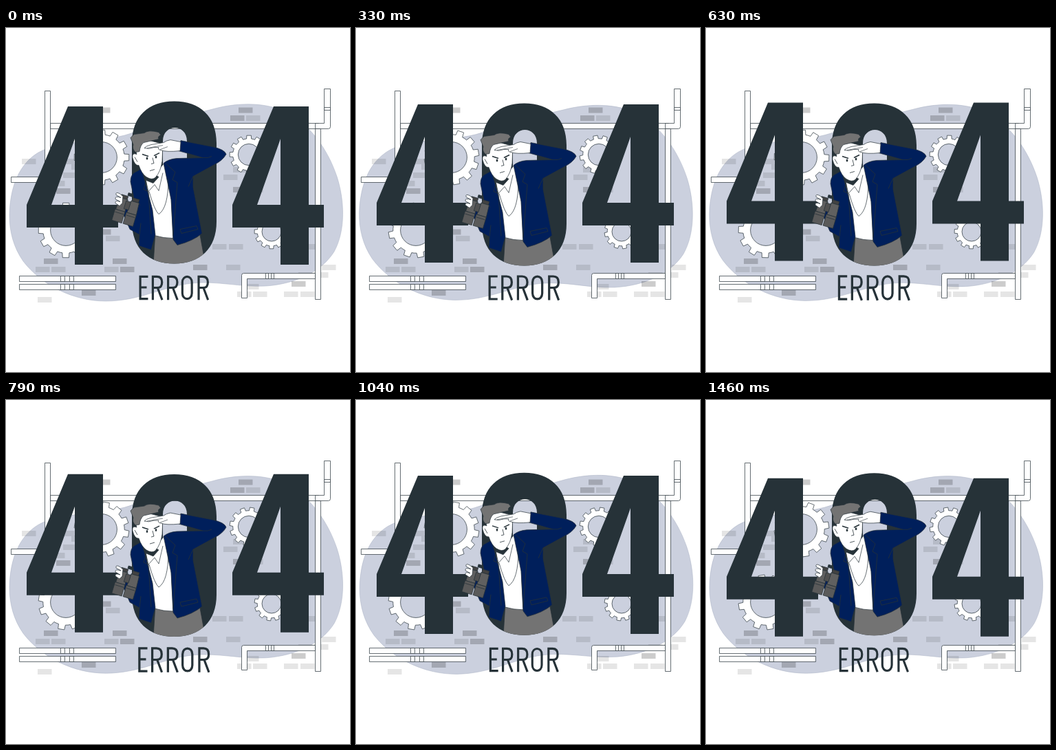
These frames come from a looping animation (500x500 px, 1500 ms). An HTML page with a canvas:

```html
<!DOCTYPE html>
<html lang="en">
<head>
<meta charset="utf-8">
<title>404 error</title>
<style>
html, body { margin: 0; width: 100%; height: 100%; overflow: hidden; background: #fff; }
canvas { display: block; width: 100vw; height: 100vh; }
</style>
</head>
<body>
<canvas id="stage" role="img" aria-label="404 ERROR"></canvas>
<script>
const LOOP = 1500;
const DARK = '#263238', NAVY = '#001f5b', GREY = '#737373', BLOB = '#cbd0de', WHITE = '#fff';
const canvas = document.getElementById('stage');
const ctx = canvas.getContext('2d');
const ratio = window.devicePixelRatio || 1;
canvas.width = canvas.height = 500 * ratio;

// Triangle wave: 1 at the peak time, -1 half a loop later.
function triangle(time, peak) {
  const phase = (((time - peak) / LOOP) % 1 + 1) % 1;
  return Math.abs(phase - 0.5) * 4 - 1;
}

function shape(d, fill, line = DARK, width = 0.7) {
  const path = typeof d === 'string' ? new Path2D(d) : d;
  if (fill) { ctx.fillStyle = fill; ctx.fill(path, 'evenodd'); }
  if (line) { ctx.strokeStyle = line; ctx.lineWidth = width; ctx.stroke(path); }
}

function box(x, y, w, h, fill = WHITE, line = DARK) {
  const path = new Path2D();
  path.rect(x, y, w, h);
  shape(path, fill, line);
}

function placed(draw, dx, dy) {
  ctx.save();
  ctx.translate(dx, dy);
  draw();
  ctx.restore();
}

function drawBlob(time) {
  ctx.save();
  ctx.translate(248, 252);
  ctx.rotate(triangle(time, 375) * Math.PI / 180);
  ctx.translate(-248, -252);
  shape('M5 272C6 230 19 198 47 181C84 160 145 169 190 150C229 134 262 128 300 118' +
    'C332 109 372 107 402 120C441 137 468 177 481 216C492 250 494 294 477 325' +
    'C459 354 421 372 378 375C340 377 306 367 270 371C227 376 194 397 145 397' +
    'C98 397 52 374 25 339C11 319 5 296 5 272Z', BLOB, '#a9b0c2', 0.5);
  ctx.restore();
}

function bricks(shade, spots) {
  for (const [x, y] of spots) box(x, y, 20.5, 8, shade, null);
}

function drawBricks() {
  bricks('rgba(0,0,0,.2)', [[338, 115.5], [326, 127], [131, 115.5], [73, 233], [330, 231],
    [132, 292.5], [55, 335], [155, 335], [166, 347], [272, 344], [110, 381], [415, 368]]);
  bricks('rgba(0,0,0,.1)', [[349, 127], [23, 190], [79, 190], [95, 198], [83, 210], [65, 222],
    [316, 213], [330, 202], [353, 231], [145, 302], [43, 347], [66, 347], [143, 347],
    [300, 314], [324, 314], [430, 314], [320, 344], [459, 344], [425, 355], [448, 355],
    [336, 383], [359, 383], [404, 383], [428, 383], [347, 372], [34, 372], [46, 391]]);
}

function drawPipes() {
  box(56, 91, 8, 130);
  box(7, 216, 60, 8);
  box(64, 138, 390, 8);
  box(449, 146, 8, 248);
  shape('M462 88H471V143Q471 146 468 146H449V138H462Z', WHITE);
  box(462, 115, 9, 4);
  shape('M449 356H345Q342 356 342 359V392H350V364H449Z', WHITE);
  box(377, 356, 4, 8);
  box(385, 356, 4, 8);
  for (const y of [360, 372]) {
    box(19, y, 140, 8);
    box(79, y, 6, 8);
    box(92, y, 6, 8);
  }
}

function drawGear(x, y, radius, time) {
  const teeth = 12;
  const root = radius * 0.83;
  const hole = radius * 0.56;
  const step = Math.PI * 2 / teeth;
  const turn = time / LOOP * Math.PI * 2;
  const path = new Path2D();
  for (let i = 0; i < teeth; i++) {
    const a = turn + i * step;
    for (const [r, offset] of [[root, -0.29], [radius, -0.22], [radius, 0.22], [root, 0.29]]) {
      path.lineTo(x + r * Math.cos(a + offset * step), y + r * Math.sin(a + offset * step));
    }
    path.arc(x, y, root, a + 0.29 * step, a + 0.71 * step);
  }
  path.closePath();
  path.moveTo(x + hole, y);
  path.arc(x, y, hole, 0, Math.PI * 2);
  shape(path, WHITE);
}

function drawFour() {
  shape('M90 114H141V257H163V290H141V344H100V290H30V257ZM100 257V161L66 257Z', DARK, null);
}

const zeroOuter = 'M183 168C183 129 207 107 244.500 107S306 129 306 168V282C306 321 282 343 244.500 343S183 321 183 282Z';

function drawZero() {
  shape(zeroOuter + 'M228 165V286C228 311 263 311 263 286V165C263 139 228 139 228 165Z', DARK, null);
}

function drawBody() {
  ctx.save();
  ctx.clip(new Path2D(zeroOuter));
  shape('M217 297L214 345H290L281 296Z', GREY);
  ctx.restore();
  shape('M203 220L214 215L230 197L239 225L243 306Q229 306 216 302Z', WHITE);
  // jacket, far side and near side
  shape('M197 205L186 211Q181 215 181 224L186 248L173 263L170 270L180 293L194 301L193 317L211 323' +
    'L217 301L213 265L204 231Z', NAVY);
  shape('M229 197Q236 191 248 190L286 189L251 179L254 164L300 173Q318 177 320 184Q315 193 303 199' +
    'L272 216L272 232L285 299Q272 310 249 316L243 308L240 250Z', NAVY);
  shape('M232 197L246 210L242 221L249 225L243 302M203 225L200 235L207 238L211 300' +
    'M272 216Q268 224 265 231M286 189Q294 190 299 187M186 248L195 258M194 301L196 284' +
    'M253 293L277 288L279 293L255 299Z', null, DARK, 0.8);
  shape('M208 238Q216 266 222 271Q236 262 236 219', null);
}

function drawHead() {
  shape('M196 203L204 222L214 226L222 217L214 212Z', DARK);
  shape('M203 221L207 238L216 228L222 237L228 211', null);
  shape('M190 170Q187 177 190 184Q183 181 184 189Q187 201 193 200Q197 212 204 217Q212 222 217 218' +
    'Q225 209 227 194L228 169L205 163Z', WHITE);
  shape('M188 181Q183 176 185 170L181 160L186 155L201 153Q207 148 222 152L225 156' +
    'Q220 158 222 162L200 167Q195 171 194 180Z', GREY);
  shape('M198 184L207 187M215 186L223 182', null, DARK, 1.5);
  shape('M213 189L215 197L211 198M209 208L216 206M187 188L191 195', null, DARK, 0.8);
  for (const [x, y] of [[205, 190], [218, 188]]) {
    const eye = new Path2D();
    eye.ellipse(x, y, 1.3, 2, 0, 0, Math.PI * 2);
    shape(eye, DARK, null);
  }
  shape('M254 166L239 163Q233 164 229 167L211 170Q203 172 201 175Q207 177 215 174L222 174' +
    'Q220 177 225 178Q233 181 253 179Z', WHITE);
  shape('M205 175L228 171M224 177L235 173', null, DARK, 0.6);
}

function drawBinoculars() {
  ctx.save();
  ctx.translate(175, 261);
  ctx.rotate(0.29);
  for (const x of [-14, 3]) {
    box(x + 2, -16, 10, 5, '#424242');
    shape(`M${x + 1} -11H${x + 13}L${x + 14} 7H${x}Z`, '#606060');
    box(x - 1, 7, 15, 17, '#5a5a5a');
    shape(`M${x} 11H${x + 13}`, null);
  }
  box(-3, -9, 7, 12, '#505050');
  box(-3, -21, 7, 4, DARK);
  ctx.restore();
  shape('M165 241Q159 238 160 243L167 247Q158 244 159 249L166 253Q158 250 159 255L165 259' +
    'L169 255L170 245Z', WHITE);
}

function drawFigure() {
  drawZero();
  drawBody();
  drawHead();
  drawBinoculars();
}

function drawError(time) {
  const keys = [[0, 103.2], [330, 105.2], [700, 107], [1040, 102.6], [1300, 101.2], [LOOP, 103.2]];
  const next = keys.findIndex(([at]) => at > time);
  const [t0, w0] = keys[next - 1], [t1, w1] = keys[next];
  const scale = (w0 + (w1 - w0) * (time - t0) / (t1 - t0)) / 104.5;
  const letter = (d, x) => placed(() => shape(d, null, DARK, 3.2), x, 0);
  ctx.save();
  ctx.translate(244, 377.5);
  ctx.scale(scale, scale);
  ctx.lineJoin = 'miter';
  letter('M13.500 -16.400H2V16.400H13.500M2 -.5H11.500', -51.5);
  for (const x of [-33, -10.5, 34.5]) {
    letter('M2 18V-16.400H8C14 -16.400 15.500 -13 15.500 -8S14 0 8 0H2M9 0L15.800 18', x);
  }
  letter('M2 -8C2 -19 16 -19 16 -8V8C16 19 2 19 2 8Z', 10.5);
  ctx.restore();
}

function draw(now) {
  const time = now % LOOP;
  ctx.setTransform(ratio, 0, 0, ratio, 0, 0);
  ctx.fillStyle = WHITE;
  ctx.fillRect(0, 0, 500, 500);
  ctx.lineJoin = 'round';
  drawBlob(time);
  drawBricks();
  placed(drawPipes, 0.5, 0.5);
  drawGear(139, 188, 40, time);
  drawGear(353, 184, 28, time);
  drawGear(87, 294, 40, time);
  drawGear(386, 296, 25, time);
  const fourLift = 3.33 * (triangle(time, 0) - 1);
  placed(drawFour, 0, fourLift);
  placed(drawFour, 299, fourLift);
  placed(drawFigure, 0, 0.5 + 3.33 * triangle(time, 480));
  drawError(time);
}

const start = performance.now();
function tick() {
  draw(performance.now() - start);
  requestAnimationFrame(tick);
}
tick();
</script>
</body>
</html>
```
